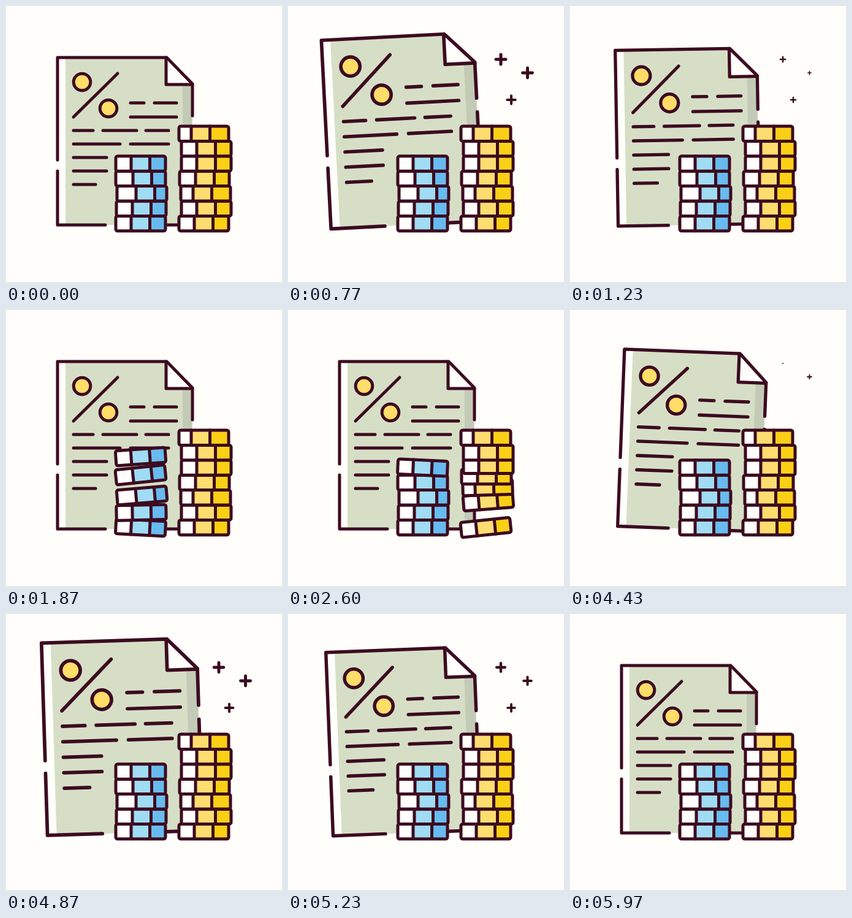
Recreate the animation shown at these times as an HTML page. Size 450 px wide and 450 px high, loop 6010 ms.

```html
<!DOCTYPE html>
<html lang="en">
<head>
<meta charset="utf-8">
<title>Paper and coins</title>
<style>
  html, body { margin: 0; width: 100%; height: 100%; overflow: hidden; background: #fffefb; }
  svg { display: block; width: 100vw; height: 100vh; }
  .ink { stroke: #3c0b20; stroke-width: 5; stroke-linecap: round; stroke-linejoin: round; }
</style>
</head>
<body>
<svg viewBox="0 0 450 450">
  <g id="paper">
    <path fill="#d6dfc6" d="M84 84H262L304 127V357H84Z"/>
    <path fill="#fffefb" d="M84 84H97V357H84Z"/>
    <path fill="#c3cbb6" d="M288 127H303V357H288Z"/>
    <path fill="#fffefb" d="M261 84L304 127H261Z"/>
    <g class="ink" fill="none">
      <path d="M84 251V84H262L304 127V179M304 199V357H210M84 269V357H162"/>
      <path d="M261 84V128H304"/>
      <path d="M110 181L182 110"/>
      <path d="M203 158H225M242 158H278M203 181H278M110 203H142M158 203H213M228 203H265"/>
      <path d="M110 225H186M203 225H265M110 247H164M110 269H164M110 291H146"/>
      <circle cx="124" cy="124" r="13.8" fill="#fedd68"/>
      <circle cx="167" cy="167" r="13.8" fill="#fedd68"/>
    </g>
  </g>
  <g id="sparks" class="ink"></g>
  <g id="coins"></g>
</svg>
<script>
const LOOP = 6010;
const SECOND_RISE = 4200; // the paper rises at 0 and again here
const SPARK_LIFE = 1100;
const TURN = 900;         // one full wobble of a coin
const COIN = { width: 81, height: 24.4, cut: 25, band: 30.5, floor: 366.8 };

const growth = [[0, 1], [560, 1.16], [960, 1.1], [1500, 1]];
const tilt = [[0, 0], [360, 3.1], [800, -3], [1500, 0]];

const sparks = [
  { x: 347, y: 87, delay: 225, size: 1 },
  { x: 390.5, y: 109, delay: 170, size: 1 },
  { x: 364, y: 153, delay: 260, size: 0.83 }
];

// Bottom to top: shift moves a coin sideways, spin moves the bands on its face.
const stacks = [
  { x: 179, start: 1345, lag: 42, light: "#a0dcf3", deep: "#67bbef",
    shift: [0, 1, 2, 0, 0], spin: [0, 1, 6, 3, 0] },
  { x: 282, start: 2395, lag: 33, light: "#fedd70", deep: "#fad016",
    shift: [0, 4, 3, 1, 4, 4, 0], spin: [0, 0, -5, 1, 0, 0, -5] }
];

const $ = id => document.getElementById(id);

function add(parent, tag, attrs) {
  const el = document.createElementNS("http://www.w3.org/2000/svg", tag);
  for (const name in attrs) el.setAttribute(name, attrs[name]);
  return parent.appendChild(el);
}

// Ease in and out between [time, value] keys.
function sample(keys, t) {
  const next = keys.findIndex(k => k[0] > t);
  if (next < 1) return keys[keys.length - 1][1];
  const [t0, a] = keys[next - 1], [t1, b] = keys[next];
  return a + (b - a) * (1 - Math.cos(Math.PI * (t - t0) / (t1 - t0))) / 2;
}

function buildCoin(stack, shift, row) {
  const { width, height } = COIN;
  const x = stack.x + shift, y = COIN.floor - (row + 1) * height;
  const cut1 = x + COIN.cut + stack.spin[row], cut2 = cut1 + COIN.band;
  const g = add($("coins"), "g", {});
  const box = (left, right, fill, more) =>
    add(g, "rect", { x: left, y, width: right - left, height, fill, ...more });
  box(x, x + width, "#fffefb", { rx: 3 });
  box(cut1, cut2, stack.light);
  box(cut2, x + width, stack.deep);
  box(x, x + width, "none", { rx: 3, class: "ink" });
  add(g, "path", { d: `M${cut1} ${y}v${height}M${cut2} ${y}v${height}`, class: "ink" });
  return { g, row, cx: x + width / 2, cy: y + height / 2 };
}

for (const stack of stacks) stack.coins = stack.shift.map((s, row) => buildCoin(stack, s, row));
for (const s of sparks) s.el = add($("sparks"), "path", { d: "M-8 0H8M0 -8V8" });

function posePaper(t) {
  $("paper").setAttribute("transform",
    `translate(194 357) rotate(${sample(tilt, t)}) scale(${sample(growth, t)}) translate(-194 -357)`);
}

function poseSpark(s, t) {
  const u = (t - s.delay) / SPARK_LIFE;
  const shown = u > 0 && u < 1;
  const size = shown ? s.size * Math.sqrt(Math.sin(Math.PI * u)) : 0;
  s.el.setAttribute("visibility", shown ? "visible" : "hidden");
  s.el.setAttribute("transform", `translate(${s.x} ${s.y}) scale(${size})`);
}

// Each coin hops, then rocks once to either side; the wave climbs the stack.
function poseCoin(stack, coin, t) {
  const phase = (t - stack.start) / TURN * 360 - coin.row * stack.lag;
  const angle = phase > 0 && phase < 360 ? -6 * Math.sin(phase * Math.PI / 180) : 0;
  const hop = (phase - 40) / 120;
  const lift = coin.row && Math.abs(hop) < 1 ? 18 * Math.cos(hop * Math.PI / 2) ** 2 : 0;
  coin.g.setAttribute("transform", `translate(0 ${-lift}) rotate(${angle} ${coin.cx} ${coin.cy})`);
}

function draw(t) {
  const local = t % SECOND_RISE;
  posePaper(local);
  for (const s of sparks) poseSpark(s, local);
  for (const stack of stacks) for (const coin of stack.coins) poseCoin(stack, coin, t);
}

const begin = performance.now();
function tick() {
  draw((performance.now() - begin) % LOOP);
  requestAnimationFrame(tick);
}
tick();
</script>
</body>
</html>
```
